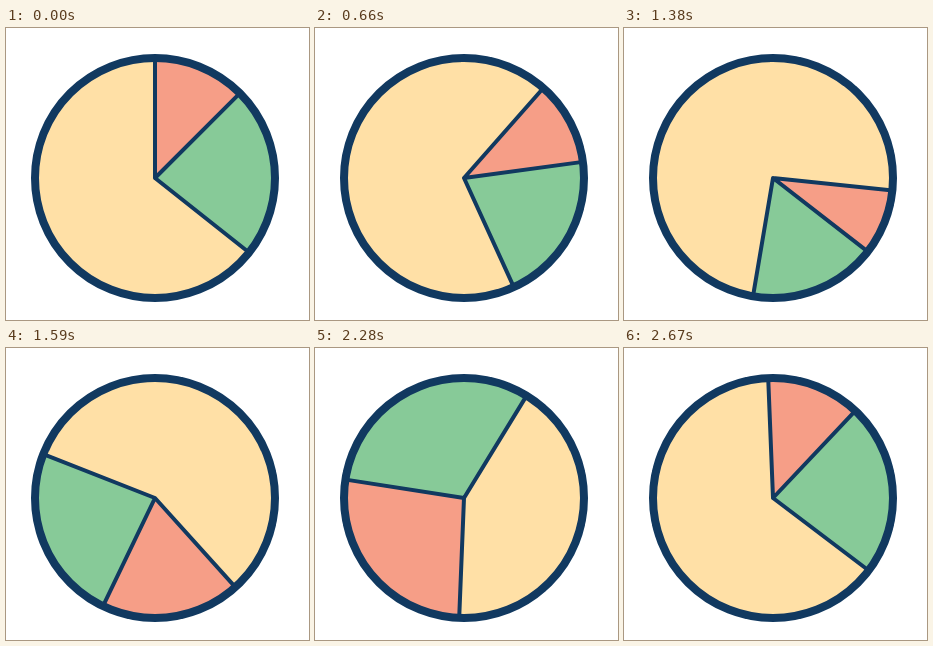
These frames come from a looping animation (303x292 px, 2.7 s). An HTML page:

```html
<!DOCTYPE html>
<html lang="en">
<head>
<meta charset="utf-8">
<title>Pie chart</title>
<style>
  html, body { margin: 0; width: 100%; height: 100%; overflow: hidden; background: #fff; }
  svg { display: block; width: 100%; height: 100%; }
  .ink { fill: none; stroke: #113960; stroke-linejoin: round; stroke-linecap: round; }
</style>
</head>
<body>
<svg viewBox="0 0 303 292">
  <g transform="translate(149 150)">
    <circle r="120" fill="#ffe0a6"/>
    <path id="red" fill="#f69e87"/>
    <path id="green" fill="#87ca98"/>
    <path id="spokes" class="ink" stroke-width="4"/>
    <circle class="ink" r="120" stroke-width="8"/>
  </g>
</svg>
<script>
const LOOP = 2700, STEP = 30, RADIUS = 118;

// Cubic Bezier easing from (0,0) to (1,1) with handles (x1,0) and (x2,1).
const bezier = (x1, x2) => x => {
  let lo = 0, hi = 1;
  for (let i = 0; i < 30; i++) {
    const t = (lo + hi) / 2, u = 1 - t;
    if (3 * u * u * t * x1 + 3 * u * t * t * x2 + t ** 3 < x) lo = t; else hi = t;
  }
  return lo * lo * (3 - 2 * lo);
};
const linear = x => x;
const gentle = bezier(.167, .833);
const smooth = bezier(1 / 3, 2 / 3);
const swing = bezier(.33, .64);

// Spoke angles in degrees clockwise from the top: [time, angle, easing towards it].
const spokes = {
  start:  [[0, 0], [450, 0, linear], [900, 90, gentle], [1350, 90, linear],
           [1800, 180, linear], [2250, 180, linear], [LOOP, 360, smooth]],
  middle: [[0, 45], [450, 45, linear], [900, 126, gentle], [1350, 126, linear],
           [1800, 266.4, swing], [2250, 277.2, gentle], [LOOP, 405, smooth]],
  end:    [[0, 128.4], [450, 128.4, linear], [900, 187.2, gentle], [1350, 187.2, linear],
           [1800, 370.8, swing], [2250, 390.2, gentle], [LOOP, 488.4, smooth]]
};

function angleAt(keys, time) {
  const i = keys.findIndex(key => key[0] > time);
  const [t0, a0] = keys[i - 1], [t1, a1, ease] = keys[i];
  return a0 + (a1 - a0) * ease((time - t0) / (t1 - t0));
}

function rim(angle) {
  const a = angle * Math.PI / 180;
  return `${(RADIUS * Math.sin(a)).toFixed(3)} ${(-RADIUS * Math.cos(a)).toFixed(3)}`;
}

const slice = (from, to) => `M0 0L${rim(from)}A${RADIUS} ${RADIUS} 0 0 1 ${rim(to)}Z`;
const setPath = (id, d) => document.getElementById(id).setAttribute('d', d);

function draw(time) {
  const [a, b, c] = Object.values(spokes).map(keys => angleAt(keys, time));
  setPath('red', slice(a, b));
  setPath('green', slice(b, c));
  setPath('spokes', [a, b, c].map(angle => `M0 0L${rim(angle)}`).join(''));
}

const origin = performance.now();
function tick() {
  const time = (performance.now() - origin) % LOOP;
  draw(Math.floor(time / STEP) * STEP);
  requestAnimationFrame(tick);
}
tick();
</script>
</body>
</html>
```
